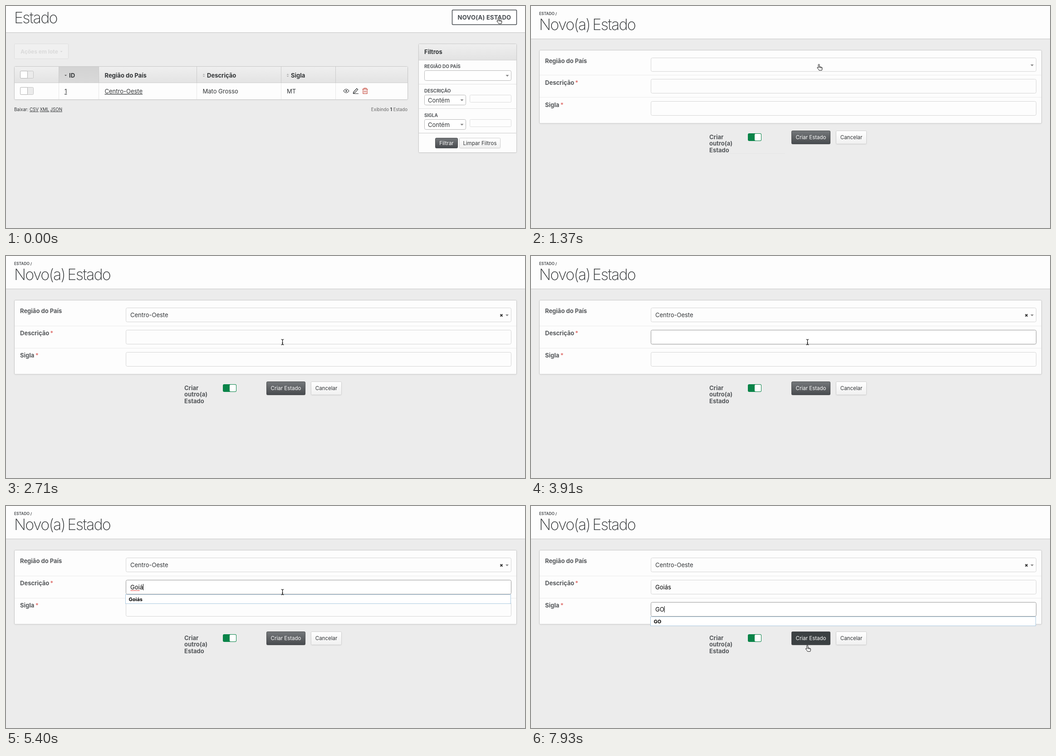
Animation, 1144 px wide and 490 px high, one loop 8 s. Source, as an HTML page:

```html
<!DOCTYPE html>
<html lang="pt-BR">
<head>
<meta charset="utf-8">
<style>
html, body { margin: 0; width: 100%; height: 100%; overflow: hidden; background: #ececec; }
svg { display: block; width: 1144px; height: 490px; font-family: Inter, "Open Sans", sans-serif; }
text { white-space: pre; }
</style>
</head>
<body>
<svg viewBox="0 0 1144 490">
  <defs>
    <linearGradient id="soft" x2="0" y2="1"><stop stop-color="#efefef"/><stop offset="1" stop-color="#e3e3e3"/></linearGradient>
    <linearGradient id="sorted" x2="0" y2="1"><stop stop-color="#d3d3d3"/><stop offset="1" stop-color="#d9d9d9"/></linearGradient>
    <linearGradient id="dark" x2="0" y2="1"><stop stop-color="#74777a"/><stop offset="1" stop-color="#484b4e"/></linearGradient>
    <linearGradient id="light" x2="0" y2="1"><stop stop-color="#fff"/><stop offset="1" stop-color="#f0f0f0"/></linearGradient>
    <filter id="shadow" x="-5%" y="-20%" width="110%" height="150%"><feDropShadow dx="0" dy="1" stdDeviation=".8" flood-opacity=".06"/></filter>
  </defs>
  <g id="stage"></g>
</svg>
<script>
const LOOP = 8000;
const stage = document.getElementById('stage');
const ruler = document.createElement('canvas').getContext('2d');

const rect = (x, y, w, h, fill, stroke = 'none', r = 0, extra = '') =>
  `<rect x="${x}" y="${y}" width="${w}" height="${h}" rx="${r}" fill="${fill}" stroke="${stroke}" ${extra}/>`;
const text = (x, y, content, size = 13, weight = 400, fill = '#323537', extra = '') =>
  `<text x="${x}" y="${y}" font-size="${size}" font-weight="${weight}" fill="${fill}" ${extra}>${content}</text>`;
const path = (d, fill, stroke = 'none', extra = '') =>
  `<path d="${d}" fill="${fill}" stroke="${stroke}" ${extra}/>`;
const line = (x1, y1, x2, y2, color) => path(`M${x1} ${y1}L${x2} ${y2}`, 'none', color);
const triangle = (x, y, w, h, color = '#888') => path(`M${x - w} ${y}h${2 * w}l${-w} ${h}z`, color);
const bold = (x, y, content, size = 13, fill = '#55585b') => text(x, y, content, size, 700, fill);
const link = (x, y, content, size) => text(x, y, content, size, 400, '#323537', 'text-decoration="underline"');
const shadow = 'filter="url(#shadow)"';

function textWidth(content) {
  ruler.font = '13px Inter, "Open Sans", sans-serif';
  return ruler.measureText(content).width;
}

// Latest entry whose time has been reached
const at = (steps, t) => steps.filter(step => step[0] <= t).pop();

const cursors = {
  hand: path('M-1.7 8.5V1.8a1.3 1.3 0 0 1 2.6 0V6q2-.8 2.3.6 1.8-.6 2 .8 1.7-.3 1.7 1V10q0 2-1 4H0q-1-2-2.5-3.5L-4.3 8.2q.5-1.7 2.6.3zM1 6v3M3.2 6.8v2.4M5.2 7.5v2', '#fff', '#111', 'stroke-linejoin="round"'),
  arrow: path('M0 0V11.5L2.7 9 4.5 13 6.4 12.2 4.7 8.4H8.2Z', '#000', '#fff', 'stroke-width="1.4" paint-order="stroke"'),
  beam: path('M-3-6q3 0 3 2 0-2 3-2M0-4V4M-3 6q3 0 3-2 0 2 3 2M-1.5 2h3', 'none', '#111', 'stroke-width="1.2"')
};

const cursorSteps = [
  [0, 'hand', 1086, 25], [300, 'arrow', 1086, 25],
  [780, 'arrow', 808, 48], [930, 'arrow', 648, 88], [1080, 'hand', 637, 115],
  [1220, 'hand', 635, 126], [1370, 'hand', 635, 128],
  [2120, 'beam', 631, 150], [2270, 'arrow', 618, 176], [2420, 'arrow', 611, 186], [2560, 'beam', 609.5, 190],
  [5700, 'beam', 596, 200], [5840, 'beam', 565, 226], [5990, 'beam', 555, 233],
  [7330, 'beam', 560, 240], [7480, 'arrow', 584, 268], [7630, 'hand', 606, 296],
  [7780, 'hand', 610, 304], [7930, 'hand', 609.5, 307]
];

// time, value, caret visible, suggestion visible
const descriptionSteps = [
  [0, '', 0, 0], [3460, '', 1, 0], [3910, '', 0, 0], [4510, 'G', 1, 1], [4660, 'Go', 1, 1],
  [4960, 'Goi', 1, 1], [5260, 'Goi´', 1, 0], [5400, 'Goiá', 1, 1], [5550, 'Goiás', 1, 1], [6290, 'Goiás', 0, 0]
];
const acronymSteps = [
  [0, '', 0, 0], [6290, '', 1, 0], [6740, 'G', 1, 1], [6890, 'GO', 1, 1],
  [7330, 'GO', 0, 1], [7930, 'GO', 1, 1]
];

const header = (height) => rect(0, 0, 1144, height, '#fdfdfd') +
  rect(0, height, 1144, 1, '#cdcdcd') + rect(0, height + 1, 1144, 1, '#e4e4e4');

const title = (y, content) =>
  text(18, y, content, 34, 200, '#323537', 'letter-spacing="-.05em" word-spacing="-.08em"');

const toggle = (x, y, on) => on
  ? rect(x + .5, y + .5, 29, 16, '#0a8449', '#0a8449', 2) + rect(x + 15, y + 1, 14, 15, '#fff', 'none', 2)
  : rect(x + .5, y + .5, 29, 16, '#ebebeb', '#c4c4c4', 2) + rect(x + .5, y + .5, 16, 16, '#fff', '#b0b0b0', 2);

const button = (x, y, w, h, label, size, fill, primary) =>
  rect(x + .5, y + .5, w - 1, h - 1, fill, primary ? '#484b4e' : '#d0d0d0', 2, shadow) +
  text(x + w / 2, y + h / 2 + 4, label, size, 400, primary ? '#fff' : '#323537', 'text-anchor="middle"');

function filterBlock(y, label) {
  return bold(922, y - 9, label, 10) +
    rect(922.5, y - 3.5, 91, 22, '#fff', '#b8b8b8', 3) + text(930, y + 13, 'Contém') +
    triangle(1005, y + 6, 3.5, 4) +
    rect(1022.5, y - 3.5, 91, 16, '#fdfdfd', '#dcdcdc', 2) + line(910, y + 26.5, 1126, y + 26.5, '#e0e0e0');
}

function listPage() {
  const sorter = x => triangle(x, 152, 2.5, -2.5, '#aaa') + triangle(x, 154, 2.5, 2.5, '#aaa');
  const columns = [116.5, 204.5, 420.5, 606.5, 726.5];
  return header(58) + title(38, 'Estado') +
    rect(983.5, 8.75, 142, 32.5, '#fff', '#43484d', 2, 'stroke-width="1.5"') +
    text(1054.5, 30, 'NOVO(A) ESTADO', 13, 700, '#43484d', 'text-anchor="middle" letter-spacing=".02em"') +
    rect(18.5, 83.5, 119, 33, '#f0f0f0', '#dedede', 2) +
    bold(32, 105, 'Ações em lote', 12, '#dadada') + triangle(122, 99.5, 2.5, 2.5, '#d4d4d4') +
    rect(18.5, 133.5, 867, 73, '#fdfdfd', '#c8c8c8', 2, shadow) +
    rect(19, 134, 866, 36, 'url(#soft)') + rect(117, 134, 88, 36, 'url(#sorted)') +
    line(19, 169.5, 885, 169.5, '#cfcfcf') +
    columns.map(x => line(x, 134, x, 170, '#cacaca') + line(x, 170, x, 206, '#e6e6e6')).join('') +
    toggle(31, 143) + toggle(31, 179) +
    triangle(131.5, 152, 2.5, 2.5, '#555') + bold(139, 158, 'ID', 13, '#323537') +
    bold(217.5, 158, 'Região do País', 13, '#323537') +
    sorter(436) + bold(443, 158, 'Descrição', 13, '#323537') +
    sorter(621) + bold(628, 158, 'Sigla', 13, '#323537') +
    link(129, 193, '1') + link(217.5, 193, 'Centro-Oeste') +
    text(433.5, 193, 'Mato Grosso') + text(619, 193, 'MT') +
    path('M744 187.5q6-8 12 0q-6 8-12 0z', 'none', '#323537', 'stroke-width="1.2"') +
    '<circle cx="750" cy="187.5" r="1.7" fill="#323537"/>' +
    path('M766 190l7-8 2.6 2.3-7 7.4-3.2.6zM765 193.5h12', 'none', '#323537', 'stroke-width="1.2"') +
    path('M785.5 183.5h12M789 183v-1.8h5v1.8M787 184v9.5h9V184M790 186.5v4.5M793 186.5v4.5', 'none', '#c0392b', 'stroke-width="1.1"') +
    text(18, 232, 'Baixar:', 9.7) + link(52, 232, 'CSV', 9.7) + link(74.5, 232, 'XML', 9.7) + link(97.5, 232, 'JSON', 9.7) +
    text(885, 232, 'Exibindo <tspan font-weight="700" fill="#323537">1</tspan> Estado', 9.7, 400, '#666', 'text-anchor="end"') +
    rect(909.5, 83.5, 216, 240, '#fdfdfd', '#cacaca', 2, shadow) +
    rect(910, 84, 215, 35, 'url(#soft)') + line(910, 119.5, 1125, 119.5, '#d0d0d0') +
    bold(922, 106, 'Filtros', 13, '#323537') +
    bold(922, 137, 'REGIÃO DO PAÍS', 10) + rect(922.5, 142.5, 191, 22, '#fff', '#b8b8b8', 3) +
    triangle(1105, 152, 3.5, 4) + line(910, 172.5, 1125, 172.5, '#e0e0e0') +
    filterBlock(200, 'DESCRIÇÃO') + filterBlock(254, 'SIGLA') +
    line(910, 280.5, 1125, 280.5, '#cacaca') +
    button(946, 291, 50, 23, 'Filtrar', 11.5, 'url(#dark)', true) +
    button(999, 291, 91, 23, 'Limpar Filtros', 11.5, 'url(#light)');
}

function field(y, [, value, caret, suggestion], focused, hint) {
  const caretX = 274.5 + (value ? textWidth(value) : 0);
  return rect(264.5, y + .5, 849, 31, focused ? '#fff' : '#fdfdfd', focused ? '#999' : '#d5d5d5', 3, focused ? shadow : '') +
    text(274, y + 21, value, 13, 400, '#000') +
    (value === 'Goiá' ? path('M275 186.5h20', 'none', '#e2403a', 'stroke-width="1.8" stroke-dasharray="1.8 1.4"') : '') +
    (caret ? line(caretX, y + 9, caretX, y + 23, '#000') : '') +
    (suggestion ? rect(263.5, y + 32.5, 849, 20, '#fff', '#a9c8e0') + text(270.5, y + 47, hint, 11, 700, '#000') : '');
}

function formPage(t) {
  const chosen = t >= 2560;
  const open = t >= 1670 && !chosen;
  const shift = chosen ? 2 : 0;
  const label = (y, content, starX) => bold(31, y, content) + (starX ? text(starX, y, '*', 13, 400, '#d9534f') : '');
  const description = field(161 + shift, at(descriptionSteps, t), t >= 3460 && t < 6290, 'Goiás');
  const acronym = field(210 + shift, at(acronymSteps, t), t >= 6290, 'GO');

  return header(72) + bold(18, 20, 'ESTADO /', 8.3) + title(53, 'Novo(a) Estado') +
    rect(18.5, 97.5, 1107, 161.5 + shift, '#fdfdfd', '#c8c8c8', 2, shadow) +
    line(19, 152.5 + shift, 1125, 152.5 + shift, '#ececec') +
    line(19, 201.5 + shift, 1125, 201.5 + shift, '#ececec') +
    label(126, 'Região do País') +
    label(173.5 + shift / 2, 'Descrição', 97.5) + label(222.5 + shift / 2, 'Sigla', 65) +
    rect(264.5, 114.5, 849, 30 + shift / 2, '#fdfdfd', '#d5d5d5', 3) +
    (open ? triangle(1104.5, 132.5, 3.5, -4) : triangle(1104.5, 129, 3.5, 4)) +
    (chosen ? text(274, 135, 'Centro-Oeste') + path('M1089.5 128.5l5 5m0-5l-5 5', 'none', '#333', 'stroke-width="1.8"') : '') +
    acronym + description +
    ['Criar', 'outro(a)', 'Estado'].map((word, i) => bold(393, 294 + shift + i * 14.4, word)).join('') +
    (chosen ? '' : line(393, 325.5, 560, 325.5, '#e6e6e6')) +
    toggle(478, 281 + shift, true) +
    button(574, 275 + shift, 86, 30, 'Criar Estado', 11.5, t >= 7630 ? '#3b3f42' : 'url(#dark)', true) +
    button(672, 275 + shift, 68, 30, 'Cancelar', 11.5, 'url(#light)') +
    (open ? dropdown() : '');
}

function dropdown() {
  return rect(264.5, 144.5, 849, 55, '#fff', '#b5b5b5') +
    rect(268.5, 148, 841, 24, '#fff', '#69a9e6', 1, 'stroke-width="2.4"') +
    line(272.5, 153, 272.5, 167, '#000') +
    rect(265, 175, 848, 24.5, '#5897fb') + text(269.5, 192, 'Centro-Oeste', 13, 400, '#fff');
}

let shown = '';
function draw() {
  const t = performance.now() % LOOP;
  const [, shape, x, y] = at(cursorSteps, t);
  const picture = (t < 300 ? listPage() : formPage(t)) + `<g transform="translate(${x} ${y})">${cursors[shape]}</g>`;
  if (picture !== shown) stage.innerHTML = shown = picture;
  requestAnimationFrame(draw);
}
draw();
</script>
</body>
</html>
```
